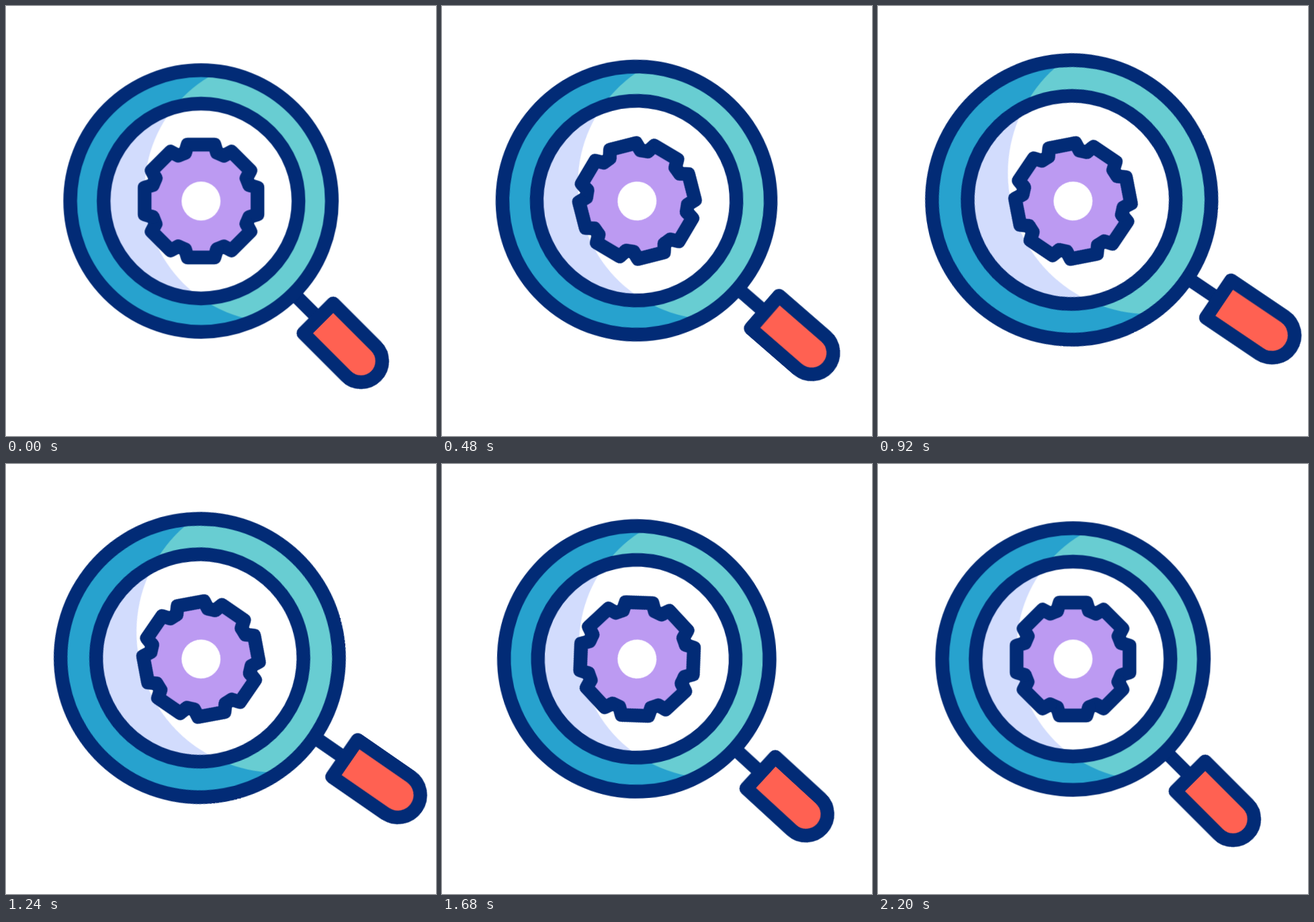
Animation of 640x640 px, one loop 2.32 s. Source, as an HTML page without scripts:

```html
<!DOCTYPE html>
<html lang="en">
<head>
<meta charset="utf-8">
<title>Search settings</title>
<style>
  html, body { margin: 0; width: 100%; height: 100%; overflow: hidden; background: #fff; }
  svg { display: block; width: 100vw; height: 100vh; }

  .line { fill: none; stroke: #022b76; stroke-width: 20.4; stroke-linecap: round; stroke-linejoin: round; }
  .glass .line { vector-effect: non-scaling-stroke; }

  .glass { animation: swing 2320ms infinite; }
  .gear { animation: spin 2320ms infinite; }

  @keyframes swing {
    0%, 3.88% {
      transform: translate(290.3px, 290.3px) rotate(0deg) scale(1);
      animation-timing-function: cubic-bezier(.5, 0, .5, 1);
    }
    43.1%, 44.74% {
      transform: translate(288.3px, 288.6px) rotate(-11.1deg) scale(1.0688);
      animation-timing-function: cubic-bezier(.5, 0, .5, 1);
    }
    87.07%, 100% { transform: translate(290.3px, 290.3px) rotate(0deg) scale(1); }
  }

  @keyframes spin {
    0%, 1.724% {
      transform: translate(290.3px, 290.3px) rotate(0deg);
      animation-timing-function: ease-in-out;
    }
    94.828%, 100% { transform: translate(290.3px, 290.3px) rotate(360deg); }
  }
</style>
</head>
<body>
<svg viewBox="0 0 640 640" xmlns="http://www.w3.org/2000/svg">
  <defs>
    <clipPath id="rim"><circle r="194.7"/></clipPath>
    <clipPath id="lens"><circle r="145"/></clipPath>
    <circle id="light" cx="112.7" cy="-16.3" r="196.5"/>
    <polyline id="tooth" class="line" points="-23.7,-71.8 -20,-84 20,-84 23.7,-71.8 34,-67.5"/>
  </defs>

  <g class="glass">
    <g transform="rotate(45)">
      <path class="line" d="M200 0H246"/>
      <path class="line" style="fill:#ff6152" d="M246.8 -31.4H336.9A31.4 31.4 0 0 1 336.9 31.4H246.8Z"/>
    </g>
    <circle r="194.7" fill="#27a2ce"/>
    <g clip-path="url(#rim)"><use href="#light" fill="#68cdd2"/></g>
    <circle r="145" fill="#d2dcfd"/>
    <g clip-path="url(#lens)"><use href="#light" fill="#fff"/></g>
    <circle class="line" r="194.7"/>
    <circle class="line" r="145"/>
  </g>

  <g class="gear">
    <circle r="76" fill="#bc9af2"/>
    <use href="#tooth"/>
    <use href="#tooth" transform="rotate(45)"/>
    <use href="#tooth" transform="rotate(90)"/>
    <use href="#tooth" transform="rotate(135)"/>
    <use href="#tooth" transform="rotate(180)"/>
    <use href="#tooth" transform="rotate(225)"/>
    <use href="#tooth" transform="rotate(270)"/>
    <use href="#tooth" transform="rotate(315)"/>
    <circle r="29" fill="#fff"/>
  </g>
</svg>
</body>
</html>
```
